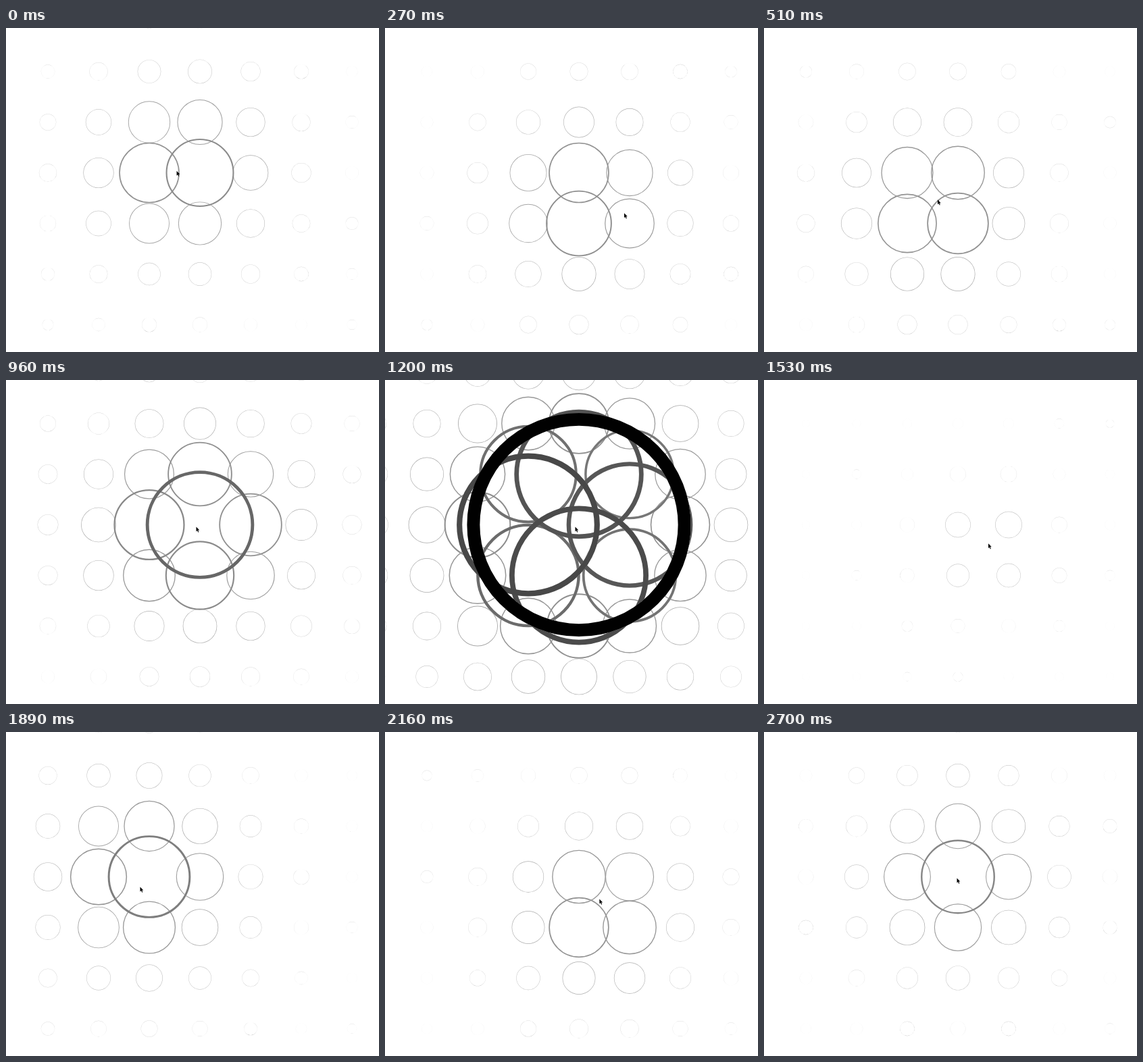
Write an HTML page with a canvas that moves like this. It is 552 by 480 pixels and loops after 2730 ms.

```html
<!DOCTYPE html>
<html lang="en">
<head>
<meta charset="utf-8">
<title>Circle grid</title>
<style>
  html, body { margin: 0; width: 100%; height: 100%; overflow: hidden; background: #fff; }
  canvas { display: block; }
</style>
</head>
<body>
<canvas id="stage" width="552" height="480"></canvas>
<script>
const ctx = document.getElementById('stage').getContext('2d');
const LOOP = 2730, STEP = 30, LAG = 30;
const GRID = 75, FALLOFF = 92, MIN_RADIUS = 4, REST = 50;
const PRESS = 886, RELEASE = 1218, GROWTH = 0.328, DECAY = 0.00402, HALF_SWING = 312;

// Turning points of the pointer: time, x, y
const path = [
  [0, 258, 212], [180, 178, 217], [340, 386, 285], [480, 251, 269],
  [700, 281, 218], [1230, 281, 218], [1580, 332, 243], [1770, 262, 176],
  [1920, 198, 230], [2040, 245, 288], [2160, 315.6, 261], [2300, 319, 198],
  [LOOP, 285, 217]
];

// Monotone tangent: the curve never overshoots its turning points
function slope(i, axis) {
  const [a, b, c] = [path[i - 1], path[i], path[i + 1]];
  if (!a || !c) return 0;
  const before = (b[axis] - a[axis]) / (b[0] - a[0]);
  const after = (c[axis] - b[axis]) / (c[0] - b[0]);
  return before * after > 0 ? 2 * before * after / (before + after) : 0;
}

function follow(time) {
  const t = Math.min(time, LOOP);
  const i = path.findIndex((p, n) => n && t <= p[0]) - 1;
  const a = path[i], b = path[i + 1], span = b[0] - a[0];
  const u = (t - a[0]) / span, v = 1 - u;
  return [1, 2].map(k =>
    v * v * (1 + 2 * u) * a[k] + u * u * (3 - 2 * u) * b[k] +
    span * u * v * (v * slope(i, k) - u * slope(i + 1, k)));
}

// Grows while pressed, then springs back
function strength(t) {
  if (t < PRESS) return REST;
  if (t < RELEASE) return REST + GROWTH * (t - PRESS);
  const s = t - RELEASE;
  return REST + GROWTH * (RELEASE - PRESS) * Math.exp(-DECAY * s) * Math.cos(Math.PI * s / HALF_SWING);
}

function drawCircle(x, y, r) {
  const fade = Math.min(1, Math.max(0, (r - 9) / 10));
  const gray = Math.max(0, Math.round(255 * (0.8 - 0.0051 * r)));
  ctx.lineWidth = r * r / 1300 + 0.2 * fade;
  ctx.strokeStyle = `rgb(${gray},${gray},${gray})`;
  ctx.beginPath();
  ctx.arc(x, y, r, 0, 2 * Math.PI);
  ctx.stroke();
}

const arrow = new Path2D('M0 0V7L1.6 5.6L2.8 8.2L3.8 7.7L2.7 5.1H4.8Z');

function draw(t) {
  ctx.globalCompositeOperation = 'source-over';
  ctx.fillStyle = '#fff';
  ctx.fillRect(0, 0, 552, 480);

  ctx.globalCompositeOperation = 'darken';
  const [cx, cy] = follow(t), size = strength(t);
  for (let y = -10.5; y < 520; y += GRID) {
    for (let x = -13; x < 590; x += GRID) {
      const d = Math.hypot(x - cx, y - cy) / FALLOFF;
      drawCircle(x, y, MIN_RADIUS + size / (1 + d * d));
    }
  }

  // The grid trails the pointer slightly
  const [px, py] = follow(t + LAG);
  ctx.save();
  ctx.translate(px + 0.5, py - 0.5);
  ctx.fillStyle = '#000';
  ctx.fill(arrow);
  ctx.restore();
}

function frame() {
  const t = performance.now() % LOOP;
  draw(Math.floor(t / STEP) * STEP);
  requestAnimationFrame(frame);
}
frame();
</script>
</body>
</html>
```
